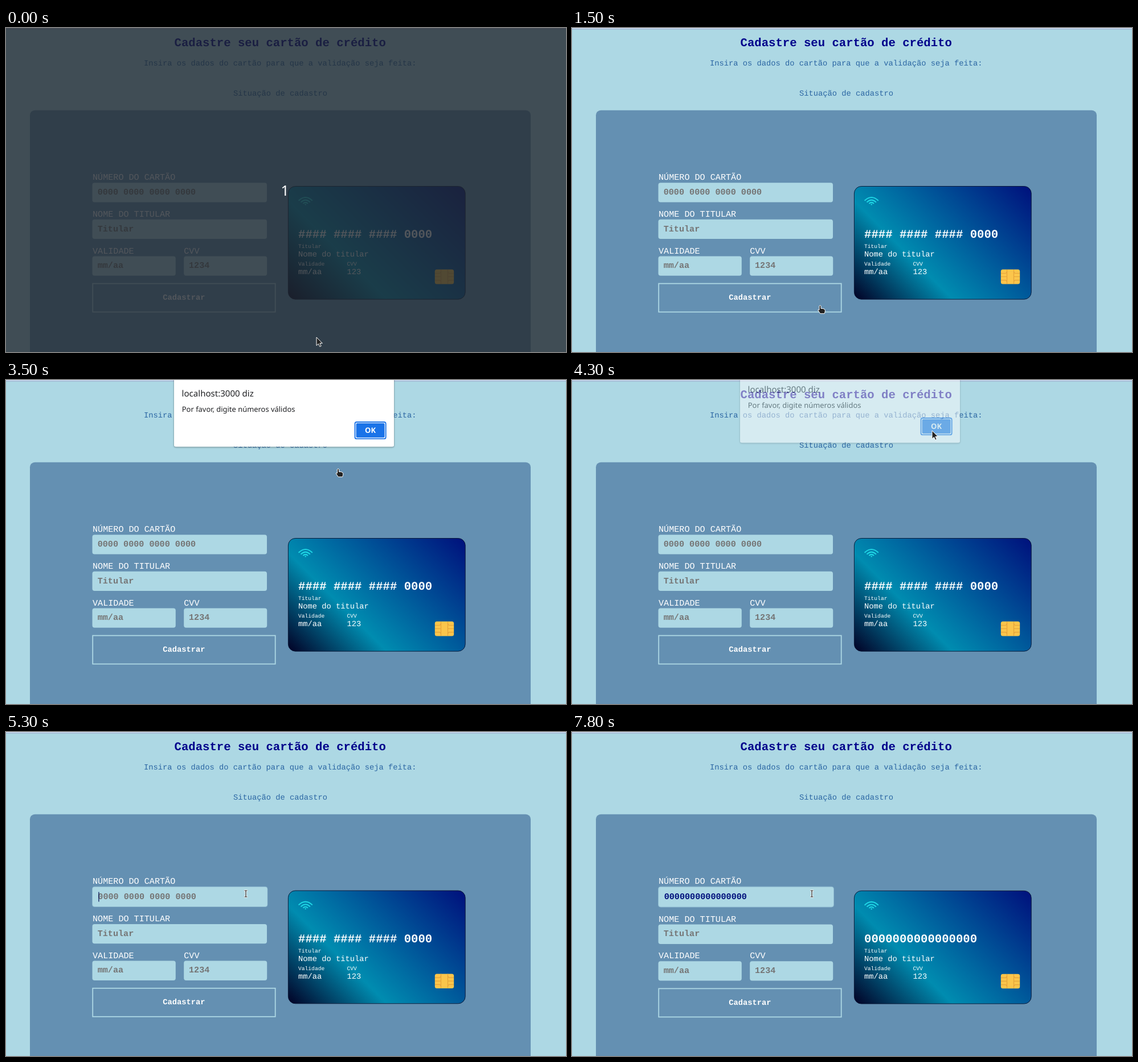
Write an HTML page that moves like this. It is 983 by 570 pixels and loops after 8000 ms.

```html
<!DOCTYPE html>
<html lang="pt-BR">
<head>
<meta charset="utf-8">
<title>Cadastro de cartão</title>
<style>
  html, body { margin: 0; width: 100%; height: 100%; overflow: hidden; background: #add8e4; }
  svg { display: block; width: 983px; height: 570px; }
  text { font-family: "Liberation Mono", monospace; font-size: 13.76px; text-rendering: geometricPrecision; white-space: pre; }
  .bold { font-weight: 700; }
  .big { font-size: 20.64px; font-weight: 700; }
  .label { font-size: 15.14px; fill: #fff; }
  .field { font-size: 15.14px; font-weight: 700; fill: #757575; }
  .tiny { font-size: 9.63px; }
  .intro { fill: #2b66a3; }
  .sans, .sans text { font-family: "Noto Sans", "Open Sans", sans-serif; }
  .box { fill: #add8e4; }
</style>
</head>
<body>
<svg viewBox="0 0 983 570">
  <defs>
    <linearGradient id="cardFill" gradientUnits="userSpaceOnUse" x1="523.3" y1="505.5" x2="778.3" y2="250.5">
      <stop offset="0" stop-color="#020024"/>
      <stop offset=".34" stop-color="#008cb0"/>
      <stop offset="1" stop-color="#00107c"/>
    </linearGradient>
    <filter id="shadow" x="-5%" y="-10%" width="110%" height="125%">
      <feDropShadow dx="0" dy="1" stdDeviation="1.6" flood-color="#000" flood-opacity=".45"/>
    </filter>
  </defs>

  <rect width="983" height="570" fill="#add8e4"/>
  <rect width="983" height="2" fill="#c9d9ef"/>
  <rect y="1.7" width="983" height="1" fill="#98adca"/>

  <text class="big" x="295.5" y="32.3" fill="#00008b">Cadastre seu cartão de crédito</text>
  <text class="intro" x="242" y="66">Insira os dados do cartão para que a validação seja feita:</text>
  <text class="intro" x="399" y="119">Situação de cadastro</text>
  <rect x="42" y="144.7" width="879" height="450" rx="8.6" fill="#6490b2"/>

  <text class="label" x="152" y="267">NÚMERO DO CARTÃO</text>
  <rect id="numberBox" class="box" x="151.5" y="272.2" rx="4" stroke="#8db9cf"/>
  <text id="number" class="field"></text>
  <rect id="caret" y="281.5" width="1.2" height="17" fill="#000c50"/>

  <g id="lower">
    <text class="label" x="152" y="332">NOME DO TITULAR</text>
    <rect class="box" x="151.5" y="336.8" width="306.5" height="34.3" rx="4"/>
    <text class="field" x="160.7" y="357.7">Titular</text>
    <text class="label" x="152" y="396.6">VALIDADE</text>
    <rect class="box" x="151.5" y="401.4" width="146.3" height="34.3" rx="4"/>
    <text class="field" x="160.7" y="422.3">mm/aa</text>
    <text class="label" x="312.3" y="396.6">CVV</text>
    <rect class="box" x="312.2" y="401.4" width="146" height="34.3" rx="4"/>
    <text class="field" x="321" y="422.3">1234</text>
    <rect x="152.2" y="449.6" width="320.5" height="50" fill="none" stroke="#add8e4" stroke-width="1.8"/>
    <text class="bold" x="275.2" y="478.2" fill="#fff">Cadastrar</text>
  </g>

  <g id="card" fill="#fff">
    <rect x="495.4" y="278.5" width="310.8" height="198.7" rx="12.5" fill="url(#cardFill)" stroke="#061230" stroke-width=".9"/>
    <g fill="none" stroke="#1fd5e4" stroke-width="2">
      <path d="M513.6 303.8Q525.7 292.2 537.8 303.8"/>
      <path d="M517.5 306.6Q525.7 298.6 533.9 306.6"/>
      <path d="M521.4 309Q525.7 304.8 530 309"/>
    </g>
    <circle cx="525.7" cy="310.4" r="1.2" fill="#1fd5e4"/>
    <text id="cardNumber" class="big" x="513" y="369"></text>
    <text class="tiny" x="513" y="387">Titular</text>
    <text x="513" y="402.4">Nome do titular</text>
    <text class="tiny" x="513" y="418">Validade</text>
    <text class="tiny" x="598.5" y="418">CVV</text>
    <text x="513" y="433.4">mm/aa</text>
    <text x="598.5" y="433.4">123</text>
    <rect x="752.8" y="424.8" width="33.4" height="25.6" rx="3.5" fill="#fbc54b"/>
    <path d="M753 431.5H761.5L763.5 429V425M753 437.5H763.5M753 443.7H761.5L763.5 446V450M763.5 429V446M786 431.5H777.5L775.5 429V425M786 437.5H775.5M786 443.7H777.5L775.5 446V450M775.5 429V446" fill="none" stroke="#e5a33a" stroke-width="1.2"/>
  </g>

  <g id="dialog" class="sans">
    <rect x="295" y="-30" width="386" height="147.3" rx="3" fill="#fff" filter="url(#shadow)"/>
    <g fill="#202124">
      <text x="308.6" y="28.6" style="font-size:15.05px">localhost:3000 diz</text>
      <text x="308.8" y="55.8" style="font-size:12.93px">Por favor, digite números válidos</text>
    </g>
    <rect x="612.5" y="74" width="54.2" height="29.4" rx="3" fill="#fff" stroke="#1a73e8" stroke-width="1.8"/>
    <rect id="ok" x="614.6" y="76.1" width="50" height="25.2" rx="2"/>
    <text x="639.6" y="93.2" text-anchor="middle" fill="#fff" style="font-size:13px;font-weight:600">OK</text>
  </g>

  <g id="countdown">
    <rect width="983" height="570" fill="#22272d" opacity=".78"/>
    <text class="sans" x="482.6" y="294.6" fill="#fff" style="font-size:25px">1</text>
  </g>

  <g id="pointer" fill="#222" stroke="#fff" stroke-linejoin="round">
    <path id="arrow" d="M0 0V14.6L3.4 11.6L5.8 16.6L8.2 15.5L5.9 10.6H10.3Z"/>
    <path id="hand" d="M-1.5 1Q0 -1 1.5 1V5.4Q6 5 8 7Q9.4 8 8.6 11.5L7.6 14.4H.2L-3.6 8.8Q-4.2 6.6 -1.5 8Z"/>
    <g id="beam" fill="none">
      <path d="M-3 -5H3M0 -5V6M-3 6H3" stroke-width="3"/>
      <path d="M-2.5 -5H2.5M0 -5V6M-2.5 6H2.5" stroke="#222" stroke-width="1.2"/>
    </g>
  </g>
</svg>
<script>
const LOOP = 8000, STEP = 100;
const part = Object.fromEntries([...document.querySelectorAll('svg [id]')].map(e => [e.id, e]));

// time, x, y
const pointerPath = [
  [400, 545, 544], [500, 538, 540], [600, 502, 521], [700, 463, 502], [800, 442, 492], [900, 435, 489],
  [1300, 435, 489], [1400, 436, 488], [1600, 435, 488], [1800, 441, 490],
  [2700, 441, 490], [3200, 487, 322], [3300, 487, 322], [3400, 533, 240], [3500, 583, 156],
  [3600, 612, 118], [3700, 624, 101], [4200, 632, 89], [4500, 632, 89],
  [4700, 590, 130], [4900, 460, 246], [5100, 421, 284]
];

const set = (el, attrs) => { for (const k in attrs) el.setAttribute(k, attrs[k]); };
const show = (el, on) => set(el, { visibility: on ? 'visible' : 'hidden' });
const ramp = (t, from, to) => Math.min(1, Math.max(0, (t - from) / (to - from)));

function pointAt(t) {
  const next = pointerPath.findIndex(k => k[0] > t);
  if (next === 0) return pointerPath[0].slice(1);
  if (next < 0) return pointerPath.at(-1).slice(1);
  const [a, b] = [pointerPath[next - 1], pointerPath[next]];
  const p = ramp(t, a[0], b[0]);
  return [1, 2].map(i => a[i] + (b[i] - a[i]) * p);
}

function drawPointer(t) {
  const [x, y] = pointAt(t);
  const shape = t >= 5000 && y > 272 ? 'beam' : t >= 800 && t < 3600 ? 'hand' : 'arrow';
  set(part.pointer, { transform: `translate(${x} ${y})` });
  for (const id of ['arrow', 'hand', 'beam']) show(part[id], id === shape);
}

function drawDialog(t) {
  const shown = t < 4300 ? ramp(t, 2300, 2600) : 1 - ramp(t, 4200, 4400);
  show(part.dialog, shown > 0);
  const slide = t < 4300 ? -22 * (1 - shown) : -14 * (1 - shown);
  set(part.dialog, { opacity: shown, transform: `translate(0 ${slide})` });
  set(part.ok, { fill: t >= 3700 ? '#2b7de9' : '#1a73e8' });
}

function drawForm(t) {
  const focus = ramp(t, 5100, 5400);
  const typed = t < 6200 ? 0 : t < 6800 ? 1 : Math.min(16, 4 + 3 * Math.floor((t - 6800) / STEP));
  set(part.numberBox, { width: 306.5 + 1.5 * focus, height: 34.3 + 1.5 * focus, 'stroke-opacity': focus });
  set(part.number, { x: 160.7 + focus, y: 293 + focus });
  part.number.textContent = typed ? '0'.repeat(typed) : '0000 0000 0000 0000';
  part.number.style.fill = typed ? '#00107c' : '';
  set(part.caret, { x: Math.min(305.4, 162 + typed * 9.086 - (typed ? 1 : 0) + .3) });
  show(part.caret, (t >= 5300 && t < 5900) || (t >= 6200 && t < 7800));
  set(part.lower, { transform: `translate(0 ${1.8 * focus})` });
  set(part.card, { transform: `translate(0 ${.9 * focus})` });
  part.cardNumber.textContent = t < 7500 ? '#### #### #### 0000' : '0'.repeat(16);
}

function draw(ms) {
  const t = Math.floor((ms % LOOP) / STEP) * STEP;
  show(part.countdown, t < 100);
  drawForm(t);
  drawDialog(t);
  drawPointer(t);
}

const start = performance.now();
function tick() {
  draw(performance.now() - start);
  requestAnimationFrame(tick);
}
tick();
</script>
</body>
</html>
```
